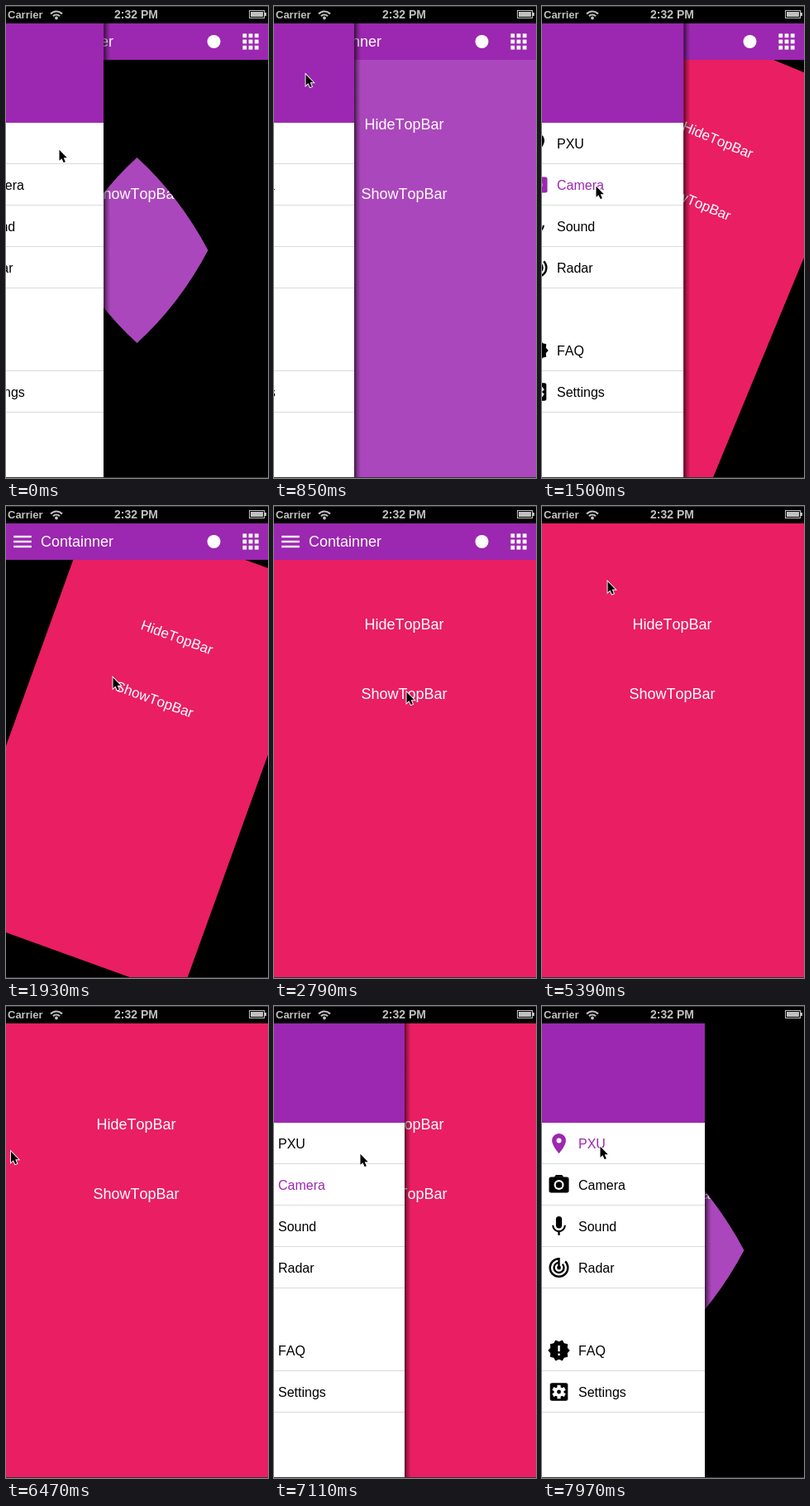
An HTML page with a canvas for the animation above (8 s loop, 317 by 570 pixels).

```html
<!DOCTYPE html>
<html lang="en">
<head>
<meta charset="utf-8">
<title>Drawer menu</title>
<style>
html, body { margin: 0; width: 100%; height: 100%; overflow: hidden; background: #000; }
canvas { display: block; }
</style>
</head>
<body>
<canvas id="stage" width="317" height="570"></canvas>
<script>
const ctx = document.getElementById('stage').getContext('2d');
const W = 317, H = 570, TOP = 21, BOTTOM = 569, BAR = 44, MENU = 197;
const CX = W / 2, CY = (TOP + BOTTOM) / 2;
const LOOP = 8000, STEP = 215.5, REOPEN = 37;
const PURPLE = '#9c27b0', LILAC = '#ab47bc', PINK = '#e91e63', GREY = '#c0c0c0', EDGE = '#333';
const FONT = '"Liberation Sans", Arial, sans-serif';

const ramp = (k, from, to) => Math.min(1, Math.max(0, (k - from) / (to - from)));
const smooth = u => u * u * (3 - 2 * u);

// The pointer travels in straight lines between these stops.
const stops = [
  { at: 0, x: 64, y: 173 },
  { at: 4, x: 38, y: 82 },
  { at: 7, x: 65, y: 217 },
  { at: 10, x: 161, y: 201 },
  { at: 13, x: 160, y: 224 },
  { at: 21, x: 160, y: 224 },
  { at: 23, x: 152, y: 140 },
  { at: 27, x: 6, y: 41 },
  { at: 30, x: 5.5, y: 175 },
  { at: 33, x: 104, y: 178 },
  { at: 37, x: 70, y: 169 }
];

function pointer(k) {
  const i = Math.max(1, stops.findIndex(s => s.at >= k));
  const a = stops[i - 1], b = stops[i], f = ramp(k, a.at, b.at);
  return [a.x + (b.x - a.x) * f, a.y + (b.y - a.y) * f];
}

// Shut, pulled open, shut, pulled open
const drawerEdge = k => MENU * (1 - ramp(k, -0.4, 0.6) + ramp(k, 3.03, 5)
  - ramp(k, 6.87, 7.87) + ramp(k, 30.6, 33.6));
const pageTilt = k => 22.5 * (1 - smooth(ramp(k, 8.73, 10)));
const diamondSize = k => 1 + 4 * smooth(ramp(k % REOPEN, 0.8, 2));
const barShift = k => -BAR * ramp(k, 23, 25);

function rect(x, y, w, h, color) {
  ctx.fillStyle = color;
  ctx.fillRect(x, y, w, h);
}

function text(str, x, y, size, color, align = 'left', weight = '') {
  ctx.font = `${weight} ${size}px ${FONT}`;
  ctx.fontKerning = 'none';
  ctx.textAlign = align;
  ctx.fillStyle = color;
  ctx.fillText(str, x, y);
}

function disc(x, y, r, color) {
  ctx.fillStyle = color;
  ctx.beginPath();
  ctx.arc(x, y, r, 0, 7);
  ctx.fill();
}

function arc(x, y, r, from, to, width, color) {
  ctx.strokeStyle = color;
  ctx.lineWidth = width;
  ctx.beginPath();
  ctx.arc(x, y, r, from * Math.PI, to * Math.PI);
  ctx.stroke();
}

function pill(x, y, w, h, r, color) {
  ctx.fillStyle = color;
  ctx.beginPath();
  ctx.roundRect(x, y, w, h, r);
  ctx.fill();
}

// Icons live on a 24 unit grid centred on 0,0.
const pin = new Path2D('M0-10C-3.9-10-7-6.9-7-3C-7 2.25 0 10 0 10S7 2.25 7-3C7-6.9 3.9-10 0-10Z');
const icons = {
  lines(c) {
    for (let i = -1; i < 2; i++) rect(-9, i * 5 - 1, 18, 2, c);
  },
  grid(c) {
    for (let i = 0; i < 9; i++) rect(i % 3 * 6 - 8, Math.floor(i / 3) * 6 - 8, 4, 4, c);
  },
  pin(c) {
    ctx.fillStyle = c;
    ctx.fill(pin);
    disc(0, -3, 2.5, '#fff');
  },
  camera(c) {
    pill(-10, -8, 20, 16, 2, c);
    ctx.beginPath();
    ctx.moveTo(-5, -7.8);
    ctx.lineTo(-3, -10);
    ctx.lineTo(3, -10);
    ctx.lineTo(5, -7.8);
    ctx.fill();
    disc(0, 0, 5, '#fff');
    disc(0, 0, 3.2, c);
  },
  mic(c) {
    pill(-3, -10, 6, 12, 3, c);
    arc(0, -1, 6.1, 0, 1, 1.7, c);
    rect(-1, 5, 2, 4, c);
  },
  radar(c) {
    for (const r of [9, 5]) arc(0, 0, r, -0.25, 1.5, 2, c);
    disc(0, 0, 2, c);
    rect(-1, -10, 2, 10, c);
  },
  badge(c) {
    ctx.fillStyle = c;
    ctx.beginPath();
    for (let i = 0; i < 20; i++) {
      const r = i % 2 ? 9 : 11, a = i * Math.PI / 10;
      ctx.lineTo(r * Math.cos(a), r * Math.sin(a));
    }
    ctx.fill();
    rect(-1, -5, 2, 6, '#fff');
    rect(-1, 3, 2, 2, '#fff');
  },
  gear(c) {
    pill(-9, -9, 18, 18, 2, c);
    disc(0, 0, 5, '#fff');
    for (let i = 0; i < 3; i++) {
      ctx.rotate(Math.PI / 3);
      rect(-1.7, -6.9, 3.4, 13.8, '#fff');
    }
    disc(0, 0, 2, c);
  }
};

function drawIcon(name, x, y, color) {
  ctx.save();
  ctx.translate(x, y);
  ctx.scale(1.2, 1.2);
  icons[name](color);
  ctx.restore();
}

const rows = [['PXU', 'pin'], ['Camera', 'camera'], ['Sound', 'mic'], ['Radar', 'radar'],
  null, ['FAQ', 'badge'], ['Settings', 'gear']];

// Diamond with slightly bulging sides
function clipDiamond(size) {
  const w = 86 * size, h = 112 * size, bx = w * 0.59, by = h * 0.59;
  ctx.beginPath();
  ctx.moveTo(0, -h);
  ctx.quadraticCurveTo(bx, -by, w, 0);
  ctx.quadraticCurveTo(bx, by, 0, h);
  ctx.quadraticCurveTo(-bx, by, -w, 0);
  ctx.quadraticCurveTo(-bx, -by, 0, -h);
  ctx.clip();
}

function drawPage(k, pink) {
  ctx.save();
  ctx.translate(CX, CY);
  if (pink) {
    const tilt = pageTilt(k), scale = 1 - tilt / 410;
    ctx.rotate(tilt * Math.PI / 180);
    ctx.scale(scale, scale);
  } else {
    clipDiamond(diamondSize(k));
  }
  ctx.translate(-CX, -CY);
  rect(0, TOP, W, BOTTOM - TOP, pink ? PINK : LILAC);
  text('HideTopBar', 157.5, 149, 18, '#fff', 'center');
  text('ShowTopBar', 157.5, 233, 18, '#fff', 'center');
  ctx.restore();
}

function drawTopBar(shift) {
  ctx.save();
  ctx.translate(0, TOP + shift);
  rect(0, 0, W, BAR, PURPLE);
  drawIcon('lines', 20, 22, '#fff');
  text('Containner', 42, 28, 18, '#fff');
  disc(251.5, 22, 8, '#fff');
  drawIcon('grid', 296, 22, '#fff');
  ctx.restore();
}

function drawDrawer(edge, selected) {
  if (edge < 0.5) return;
  const shade = ctx.createLinearGradient(edge, 0, edge + 8, 0);
  shade.addColorStop(0, 'rgba(0,0,0,.65)');
  shade.addColorStop(0.5, 'rgba(0,0,0,.25)');
  shade.addColorStop(1, 'rgba(0,0,0,0)');
  rect(edge, TOP, 8, BOTTOM - TOP, shade);
  ctx.save();
  ctx.translate(Math.round(edge) - MENU, 0);
  rect(0, TOP, MENU, BOTTOM - TOP, '#fff');
  rect(0, TOP, MENU, 120, PURPLE);
  rows.forEach((row, i) => {
    if (!row) return;
    const [label, icon] = row, mid = 166 + i * 50;
    const color = label === selected ? PURPLE : '#000';
    rect(0, mid + 24, MENU, 1, '#dadada');
    text(label, 44, mid + 6, 16, color);
    drawIcon(icon, 20.5, mid, color);
  });
  ctx.restore();
}

function drawStatus() {
  rect(0, 0, W, TOP, '#000');
  rect(0, 0, W, 1, EDGE);
  text('Carrier', 2, 15, 13, GREY, 'left', 'bold');
  text('2:32 PM', 157.5, 15, 14, GREY, 'center', 'bold');
  for (const r of [5.5, 9.5]) arc(61, 16, r, -0.76, -0.24, 2.2, GREY);
  disc(61, 14.5, 1.9, GREY);
  ctx.strokeStyle = GREY;
  ctx.lineWidth = 1;
  ctx.strokeRect(294.5, 5.5, 18, 9);
  rect(296, 7, 15, 6, GREY);
  rect(313, 8, 2, 4, GREY);
}

const arrow = new Path2D('M0 0V14.5L3.3 11.5L5.7 17L8.2 16L5.8 10.6H10.3Z');
function drawCursor(x, y) {
  ctx.save();
  ctx.translate(x + 0.5, y + 0.8);
  ctx.scale(0.9, 0.9);
  ctx.strokeStyle = '#fff';
  ctx.lineWidth = 2;
  ctx.stroke(arrow);
  ctx.fillStyle = '#000';
  ctx.fill(arrow);
  ctx.restore();
}

function draw(time) {
  const k = Math.floor((time + 14) / STEP);
  const pink = k >= 7 && k < REOPEN;
  rect(0, 0, W, H, '#000');
  ctx.save();
  ctx.beginPath();
  ctx.rect(0, TOP, W, BOTTOM - TOP);
  ctx.clip();
  drawPage(k, pink);
  drawTopBar(barShift(k));
  drawDrawer(drawerEdge(k), pink ? 'Camera' : 'PXU');
  ctx.restore();
  rect(0, BOTTOM, W, 1, EDGE);
  drawStatus();
  drawCursor(...pointer(k));
}

function tick() {
  draw(performance.now() % LOOP);
  requestAnimationFrame(tick);
}
tick();
</script>
</body>
</html>
```
